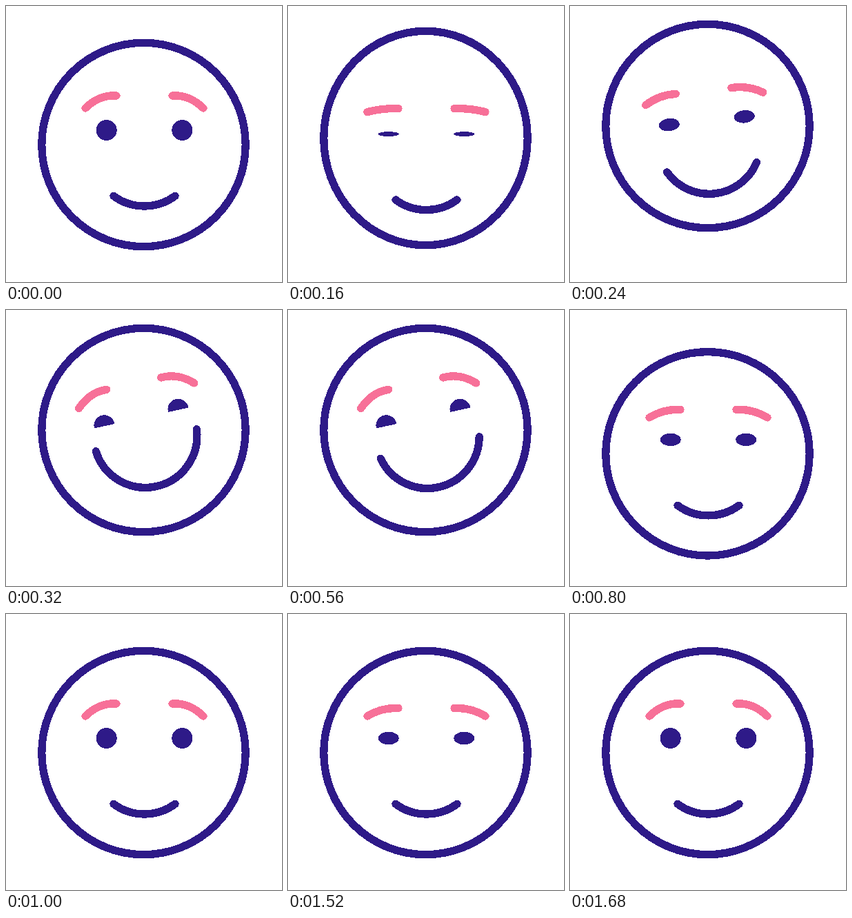
Recreate the animation shown at these times as an HTML page. Size 400 by 400 pixels, loop 2.56 s.

```html
<!DOCTYPE html>
<html>
<head>
<meta charset="utf-8">
<style>
  html, body { margin: 0; overflow: hidden; background: #fff; }
  svg { display: block; fill: none; stroke-width: 11.3px; stroke-linecap: round; shape-rendering: crispEdges; }
  .ink { stroke: #2e1a88; }
  .pink { stroke: #f77098; }
  .eye { fill: #2e1a88; }
  .cheeks { fill: #fff; }
</style>
</head>
<body>
<svg width="400" height="400" viewBox="0 0 400 400">
  <ellipse id="head" class="ink" cx="199.5" rx="147.7"/>
  <g id="face">
    <g id="side">
      <path id="brow" class="pink"/>
      <ellipse id="eye" class="eye" cx="54.8" cy="-21" rx="15"/>
    </g>
    <use href="#side" transform="scale(-1 1)"/>
    <rect id="cheeks" class="cheeks" x="-75" width="150" height="18"/>
    <path id="mouth" class="ink"/>
  </g>
</svg>
<script>
const LOOP = 2560, STEP = 40, SMILE_RADIUS = 75;

function set(id, attributes) {
  const element = document.getElementById(id);
  for (const name in attributes) element.setAttribute(name, attributes[name]);
}

// Smooth step from 0 at time a to 1 at time b.
function ramp(t, a, b) {
  const u = Math.min(1, Math.max(0, (t - a) / (b - a)));
  return u * u * (3 - 2 * u);
}

// Rises from a to b, stays at 1, falls from c to d.
const pulse = (t, a, b, c, d) => ramp(t, a, b) - ramp(t, c, d);
const blink = (t, start) => pulse(t, start, start + 80, start + 120, start + 200);

function draw(t) {
  // The head crouches and leaps, stretching halfway; the face lags behind it.
  const leap = pulse(t, 80, 240, 600, 756);
  const headY = 8 * pulse(t, 0, 80, 756, 1000) - 35 * leap;
  const faceY = 8 * pulse(t, 0, 130, 785, 1000) - 33 * pulse(t, 130, 310, 640, 785);
  const tilt = -12.4 * pulse(t, 160, 320, 600, 785);
  set('head', { cy: 201 + headY, ry: 147.7 + 30 * leap * (1 - leap) });
  set('face', { transform: `translate(200.5 ${201 + faceY}) rotate(${tilt})` });

  const lid = 1 - 0.77 * (blink(t, 80) + blink(t, 640) + blink(t, 1480));
  const browTop = y => -53 - 18 * y * (0.06 + 0.94 * lid);
  set('eye', { ry: 15 * lid });
  set('brow', { d: `M85.5 -53C72 ${browTop(0.72)} 57 ${browTop(1.06)} 40.5 ${browTop(1)}` });

  // Raised cheeks hide the lower part of the eyes.
  const squint = pulse(t, 200, 320, 560, 660);
  set('cheeks', { y: -5 - 15 * squint, visibility: squint > 0 ? 'visible' : 'hidden' });

  const smile = pulse(t, 160, 320, 520, 680);
  const angle = (36.4 + 48.6 * smile) * Math.PI / 180;
  const x = SMILE_RADIUS * Math.sin(angle);
  const y = 14 - 7.5 * smile + SMILE_RADIUS * Math.cos(angle);
  set('mouth', { d: `M${-x} ${y}A${SMILE_RADIUS} ${SMILE_RADIUS} 0 0 0 ${x} ${y}` });
}

const start = performance.now();
function tick() {
  const t = (performance.now() - start) % LOOP;
  draw(Math.floor(t / STEP) * STEP);
  requestAnimationFrame(tick);
}
tick();
</script>
</body>
</html>
```
